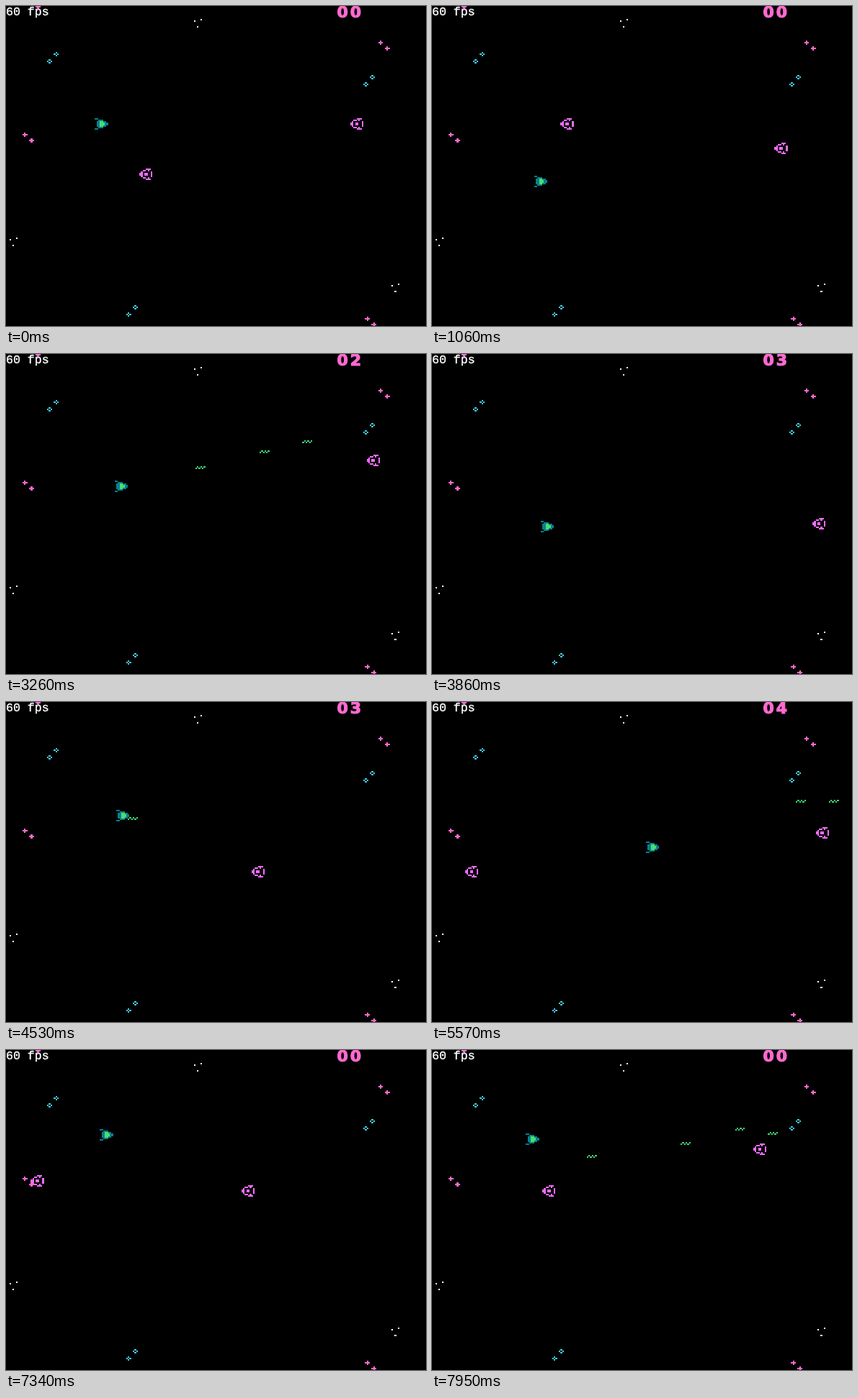
Recreate the animation shown at these times as an HTML page. Size 583 px wide and 445 px high, loop 8 s.

```html
<!DOCTYPE html>
<html lang="en">
<head>
<meta charset="utf-8">
<title>Space shooter</title>
<style>
html, body { margin: 0; width: 100%; height: 100%; overflow: hidden; background: #000; }
svg { display: block; width: 583px; height: 445px; }
path { shape-rendering: crispEdges; }
#fps { font: 16.6px "Liberation Mono", monospace; fill: #fff; stroke: #fff; stroke-width: .4; }
#score { font: bold 22px "DejaVu Sans", sans-serif; letter-spacing: 3px; fill: #ff6ad0; stroke: #ff6ad0; stroke-width: 1.2; }
</style>
</head>
<body>
<svg viewBox="0 0 583 445">
  <rect width="583" height="445"/>
  <g id="stars"></g>
  <g id="actors"></g>
  <text id="fps" x="0" y="13" xml:space="preserve">60 fps</text>
  <text id="score" x="459.5" y="16">00</text>
</svg>
<script>
const LOOP = 8000, CRASH = 6130, EDGE = 583;
const PX = 16 / 7, PY = 2;                       // size of one game pixel
const SAUCER_SPEED = 0.2825, SHOT_SPEED = 2 * SAUCER_SPEED, REACH = 14;
const colors = { P: '#f26cff', K: '#ff6ad0', C: '#45c8e0', W: '#fff', T: '#087f8c', G: '#46e06c', S: '#3fd673' };

const mirror = rows => [...rows, ...[...rows].reverse()];
const sprites = {
  saucer: mirror(['....PPP.', '..PP.P..', '.P.....P', 'PP.PP..P']),
  ship: mirror(['TT......', '..TTT...', '.TTGGTT.', '.TTGGGTT']),
  shot: ['.S.S.S', 'S.S.S.'],
  plus: ['...K', '..KKK', '...K', '', '.......K', '......KKK', '.......K'],
  ring: ['......C', '.....C.C', '......C', '', '', '..C', '.C.C', '..C'],
  dot: ['', '......W', '..W', '', '', '', '....W']
};

const $ = id => document.getElementById(id);
const add = (tag, parent) => parent.appendChild(document.createElementNS('http://www.w3.org/2000/svg', tag));

// Builds one path per colour from rows of letters.
function makeSprite(name, parent) {
  const g = add('g', $(parent)), paths = {};
  sprites[name].forEach((row, y) => [...row].forEach((c, x) => {
    if (c !== '.') paths[c] = (paths[c] || '') + `M${x * PX} ${y * PY}h${PX}v${PY}h${-PX}z`;
  }));
  for (const c in paths) {
    const p = add('path', g);
    p.setAttribute('d', paths[c]);
    p.setAttribute('fill', colors[c]);
  }
  return { g, w: sprites[name][0].length, h: sprites[name].length };
}

const toCell = ({ g }, col, row) => g.setAttribute('transform', `translate(${col * PX} ${row * PY})`);

// Centres a sprite on a point, snapped to game pixels.
function place(sprite, x, y, visible = true) {
  sprite.g.setAttribute('visibility', visible ? 'visible' : 'hidden');
  toCell(sprite, Math.round(x / PX) - sprite.w / 2, Math.round(y / PY) - sprite.h / 2);
}

const sky = {
  plus: [[224, 24], [8, 88], [216, 216], [12, -5]],
  ring: [[24, 32], [216, 48], [72, 208]],
  dot: [[112, 8], [0, 160], [232, 192]]
};
for (const name in sky)
  for (const cell of sky[name]) toCell(makeSprite(name, 'stars'), ...cell);

// Straight lines between key points of [time, value]
function follow(keys, t) {
  const i = keys.findIndex(k => k[0] > t);
  const [t0, a] = keys[i - 1], [t1, b] = keys[i];
  return a + (b - a) * (t - t0) / (t1 - t0);
}
const shipX = [[0, 133], [1060, 151], [3260, 160], [4550, 162], [CRASH, 384],
  [CRASH, 46], [6670, 46], [7340, 139], [LOOP, 139]];
const shipY = [[0, 164], [420, 164], [1140, 254], [1280, 254], [2660, 104], [3690, 240],
  [3950, 240], [4690, 136], [5087, 138], [5740, 225], [CRASH, 184],
  [CRASH, 168], [6670, 168], [7440, 110], [7680, 148], [7803, 148], [LOOP, 116]];
const shipAt = t => [follow(shipX, t), follow(shipY, t)];

// Time of entering at the right edge, height
const saucers = [[-1371, 234], [-340, 164], [709, 198], [1755, 170], [3005, 148],
  [3702, 236], [4640, 136], [5428, 182], [6463, 196], [7501, 138]]
  .map(([t0, y]) => ({ t0, y, end: Infinity, sprite: makeSprite('saucer', 'actors') }));

const shots = [1700, 2050, 2799, 2908, 3066, 4505, 4800, 4979, 5087, 7358, 7440, 7572, 7803]
  .map(t0 => ({ t0, from: shipAt(t0), end: Infinity, sprite: makeSprite('shot', 'actors') }));

// A shot ends the first saucer it meets at nearly its own height.
for (const shot of shots) {
  const [x, y] = shot.from;
  for (const s of saucers) {
    const meet = (EDGE - x + SAUCER_SPEED * s.t0 + SHOT_SPEED * shot.t0) / (SAUCER_SPEED + SHOT_SPEED);
    const near = Math.abs(s.y - y) <= REACH && meet > shot.t0 && meet > s.t0;
    if (near && meet < s.end && meet < shot.end) s.end = shot.end = meet;
  }
}
const ship = makeSprite('ship', 'actors');

function draw(t) {
  for (const { t0, y, end, sprite } of saucers) {
    const x = EDGE - SAUCER_SPEED * (t - t0);
    place(sprite, x, y, t < end && x > 8 && x < EDGE + 12);
  }
  for (const { t0, from: [x0, y], end, sprite } of shots) {
    place(sprite, x0 + SHOT_SPEED * (t - t0), y, t >= t0 && t < end);
  }
  place(ship, ...shipAt(t));
  const since = t < CRASH ? 0 : CRASH;
  const points = saucers.filter(s => s.end > since && s.end <= t).length;
  $('score').textContent = String(points).padStart(2, '0');
}

const start = performance.now();
function tick() {
  draw((performance.now() - start) % LOOP);
  requestAnimationFrame(tick);
}
tick();
</script>
</body>
</html>
```
